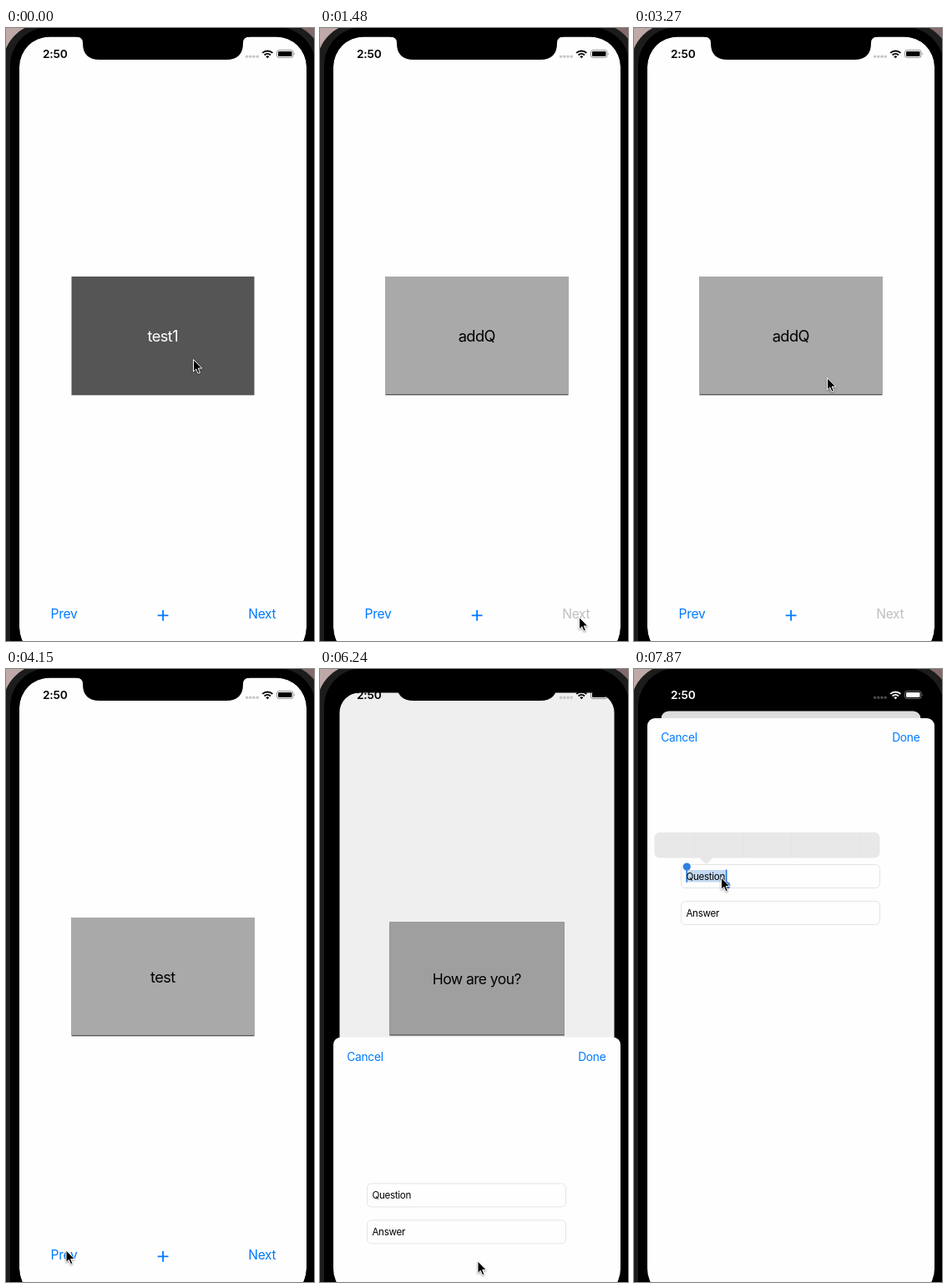
These frames come from a looping animation (369 by 735 pixels, 8000 ms). An HTML page:

```html
<!DOCTYPE html>
<html lang="en">
<head>
<meta charset="utf-8">
<title>Flash cards</title>
<style>
  html, body { margin: 0; width: 100%; height: 100%; overflow: hidden; background: #000; }
  svg { display: block; width: 369px; height: 735px; font-family: Inter, "Liberation Sans", sans-serif; }
  text { white-space: pre; }
  .blue { fill: #007aff; }
  .nav { font-size: 15.6px; letter-spacing: -.3px; }
  .bar { font-size: 13.8px; letter-spacing: -.3px; }
  .field rect { fill: #fefefe; stroke: #e4e4e4; }
  .field text { font-size: 11.6px; letter-spacing: -.3px; }
  #label { font-size: 18.3px; letter-spacing: -.6px; text-anchor: middle; }
  #clock { font-size: 13.7px; font-weight: 600; letter-spacing: -.2px; }
  #cursor { filter: drop-shadow(0 1px 1px rgba(0, 0, 0, .4)); }
</style>
</head>
<body>
<svg viewBox="0 0 369 735">
  <defs>
    <clipPath id="screen"><rect x="16" y="10.5" width="344" height="744.5" rx="36"/></clipPath>
    <linearGradient id="desk">
      <stop offset="0" stop-color="#bfaaa9"/><stop offset="1" stop-color="#83696a"/>
    </linearGradient>
  </defs>

  <!-- phone body -->
  <rect width="369" height="735" fill="url(#desk)"/>
  <rect x="-4" y="-6" width="384" height="800" rx="50" fill="#1c1c1c"/>
  <rect x="5" y="-1" width="366" height="790" rx="46"/>

  <g clip-path="url(#screen)">
    <g id="page">
      <rect class="round" x="16" y="10.5" width="344" height="744.5" fill="#fefefe"/>
      <rect x="78.5" y="298" width="219" height="142.3" fill="#555"/>
      <rect id="question" x="78.5" y="298" width="219" height="141" fill="#a9a9a9"/>
      <text id="label" x="187.8" y="376"></text>
      <text id="prev" class="nav" x="53.5" y="708">Prev</text>
      <path d="M181.7 704.3h12.8M188.1 697.9v12.8" stroke="#007aff" stroke-width="1.8"/>
      <text id="next" class="nav" x="290.2" y="708">Next</text>
      <rect id="dim" class="round" x="16" y="10.5" width="344" height="744.5"/>
    </g>

    <g id="sheet">
      <rect x="16" width="344" height="760" rx="9" fill="#fefefe"/>
      <text class="bar blue" x="32.3" y="28.4">Cancel</text>
      <text class="bar blue" x="309.2" y="28.4">Done</text>
      <g class="field">
        <rect x="56.5" y="175.5" width="238" height="28" rx="5"/>
        <g id="selection">
          <rect x="63" y="182" width="48" height="14.5" style="fill:#c3d9f1;stroke:none"/>
          <path d="M63.2 180v16.8M110.7 181.5v20" stroke="#2b79df" stroke-width="1.6"/>
          <circle cx="63.3" cy="178" r="4.6" fill="#2f7fe4"/>
          <circle cx="110.7" cy="200.5" r="4.6" fill="#2f7fe4"/>
        </g>
        <path id="caret" d="M111.5 182v14.5" stroke="#2b79df" stroke-width="1.6"/>
        <text x="62.4" y="193.8">Question</text>
      </g>
      <g class="field">
        <rect x="56.5" y="219.5" width="238" height="28" rx="5"/>
        <text x="62.4" y="237.8">Answer</text>
      </g>
      <g id="menu">
        <path d="M78 167l8.5 8.3 8.5-8.3z" fill="#e8e8e8"/>
        <rect x="24.5" y="137" width="270" height="30.5" rx="6" fill="#e8e8e8"/>
        <path d="M72.5 137v30.5M130.500 137v30.500M188.500 137v30.500M269.500 137v30.500" stroke="#e4e4e4"/>
      </g>
    </g>
  </g>

  <!-- notch and status bar -->
  <path d="M84 9.500V10.500Q92 10.500 92 18Q92 38 112 38H264Q284 38 284 18Q284 10.500 292 10.500V9.500z"/>
  <g id="status">
    <text id="clock" x="44" y="36">2:50</text>
    <g id="dots"></g>
    <g fill="none" stroke="currentColor" stroke-width="2">
      <path d="M307.200 29.900a8.700 8.700 0 0 1 12.200 0M309.600 32.500a5.300 5.300 0 0 1 7.400 0"/>
    </g>
    <path d="M313.300 36.300l-2-2.100a2.900 2.900 0 0 1 4 0z"/>
    <rect x="324.500" y="26.500" width="19.500" height="9" rx="2.500" fill="none" stroke="currentColor" stroke-opacity=".4"/>
    <rect x="326" y="28" width="16.500" height="6" rx="1.200"/>
    <path d="M345 29.500q1.600 1.500 0 3z" opacity=".5"/>
  </g>

  <path id="cursor" d="M0 0V14.400L3.300 11.400L5.600 16.700L7.900 15.700L5.700 10.500H10.300z" stroke="#fff"/>
</svg>

<script>
const $ = id => document.getElementById(id);
const LOOP = 8000, TICK = 148.5, LEAD = 12;
const BLUE = '#007aff', GREY = '#bfbfc1', PRESSED = '#b9d9ff';

// [tick, x, y]: the pointer holds each place until the next entry
const path = [
  [0, 224.5, 397.5], [4, 229, 412], [5, 250, 485], [6, 283, 600], [7, 312, 682],
  [8, 323, 704], [9, 313, 706], [10, 310.5, 706.5], [11, 285, 631], [12, 252, 500],
  [13, 234, 428], [14, 231.5, 419.5], [23, 222, 440], [24, 180, 530], [25, 120, 640],
  [26, 82, 690], [27, 72, 697], [35, 71.5, 697], [36, 105, 665], [37, 190, 650],
  [38, 268, 690], [39, 226, 719], [40, 189, 710], [43, 186, 610], [44, 170, 422],
  [45, 138, 310], [46, 114, 264], [47, 106, 252], [48, 104.5, 250]
];

// [tick, text, is answer]
const cards = [
  [0, 'test1', true], [10, 'addQ', false], [14, 'addA', true], [21, 'addQ', false],
  [28, 'test', false], [30, 'How are you?', false]
];
const prevFill = [[0, BLUE], [27, PRESSED], [28, BLUE], [30, GREY]];
const nextFill = [[0, BLUE], [10, GREY], [28, BLUE]];

const at = (steps, n) => steps.findLast(s => s[0] <= n);
const show = (id, on) => $(id).setAttribute('visibility', on ? 'visible' : 'hidden');
const set = (id, name, value) => $(id).setAttribute(name, value);

for (let i = 0; i < 4; i++) {
  $('dots').innerHTML += `<rect x="${287 + i * 4.2}" y="32.800" width="3.200" height="3" rx=".8"/>`;
}

// Critically damped spring: share of the way still to go
function remaining(n) {
  if (n < 42) return 1;
  const u = 1.525 + 2.71 * (n - 42);
  return (1 + u) * Math.exp(-u);
}

function draw(n) {
  const [, x, y] = at(path, n);
  set('cursor', 'transform', `translate(${x} ${y})`);

  const [, text, answer] = at(cards, n);
  $('label').textContent = text;
  set('label', 'fill', answer ? '#fff' : '#000');
  show('question', !answer);
  set('prev', 'fill', at(prevFill, n)[1]);
  set('next', 'fill', at(nextFill, n)[1]);

  const rest = remaining(n), p = 1 - rest, scale = 1 - .0965 * p;
  set('page', 'transform', `translate(188 ${383 + 4 * p}) scale(${scale}) translate(-188 -383)`);
  for (const r of document.querySelectorAll('.round')) r.setAttribute('rx', (36 - 27 * p) / scale);
  set('dim', 'opacity', .13 * p);
  set('sheet', 'transform', `translate(0 ${59 + 696 * rest})`);

  const light = n >= 43;
  $('status').style.color = light ? '#fff' : '#000';
  set('status', 'fill', 'currentColor');
  set('dots', 'fill', light ? '#4a4a4a' : '#c6c6c6');

  show('caret', n === 51);
  show('selection', n >= 52);
  show('menu', n >= 53);
}

let last = -1;
function frame() {
  const n = Math.floor((performance.now() % LOOP + LEAD) / TICK);
  if (n !== last) draw(last = n);
  requestAnimationFrame(frame);
}
frame();
</script>
</body>
</html>
```
